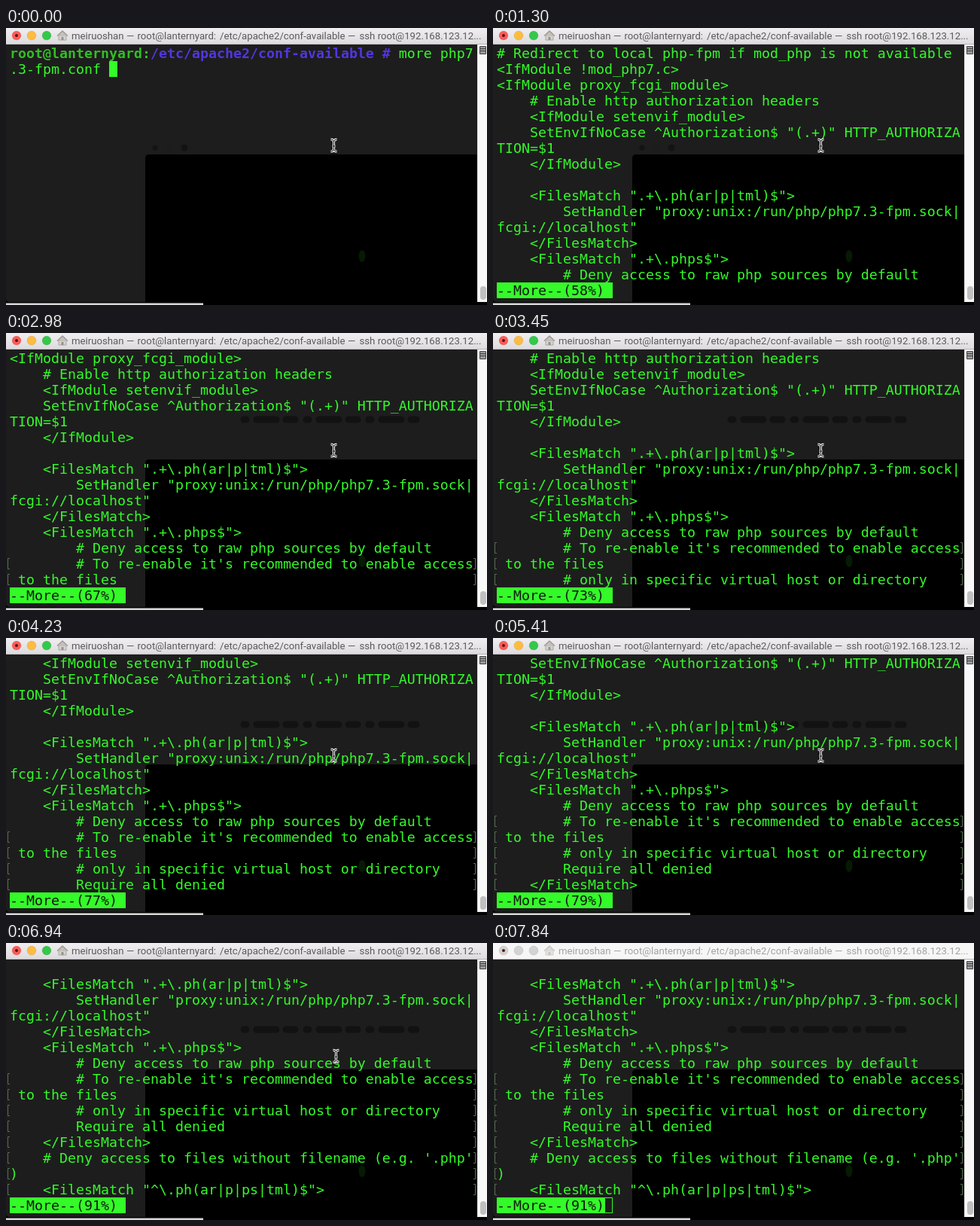
An HTML page for the animation above (7.94 s loop, 639x368 px).

```html
<!DOCTYPE html>
<html lang="en">
<head>
<meta charset="utf-8">
<title>Terminal pager</title>
<style>
  html, body { margin: 0; width: 100%; height: 100%; overflow: hidden; background: #000; }
  #stage { position: relative; width: 639px; height: 368px; overflow: hidden; --green: #34fa29; }
  svg { position: absolute; left: 0; top: 0; }
  .title { font: 13.2px Roboto, "Liberation Sans", sans-serif; fill: #5b5b5b; }
  #bar { fill: url(#active); }
  .idle #bar { fill: #f6f6f6; }
  .idle .light { fill: #d3d3d3; }
  .idle .title { fill: #a2a2a2; }
  .idle .home { opacity: .5; }
  pre {
    position: absolute; left: 5px; top: 23px; margin: 0;
    font: 18.27px/21px "DejaVu Sans Mono", monospace; color: var(--green);
  }
  b { color: #34bd25; }
  b + b { color: #5335e2; }
  #more { position: absolute; left: 5px; top: 338px; width: 143px; height: 21px; background: var(--green); }
  #more pre { left: 0; top: 0; color: #101810; }
  #cursor { position: absolute; box-sizing: border-box; width: 11px; height: 21px; background: var(--green); }
  .idle #cursor { background: none; border: 1px solid var(--green); }
</style>
</head>
<body>
<div id="stage">
  <svg width="639" height="368">
    <defs>
      <linearGradient id="active" x2="0" y2="1">
        <stop stop-color="#f0eef0"/><stop offset="1" stop-color="#dddbdd"/>
      </linearGradient>
    </defs>
    <path d="M0 365.5H262V368H0Z" fill="#d8d8d8"/>
    <path d="M0 21H627V364H5Q0 364 0 359Z" fill="#1d1d1d"/>
    <path d="M185 364V173Q185 168 190 168H627V364Z" fill="#000"/>
    <g id="dots" fill="#121412">
      <circle cx="198" cy="159" r="3.5"/><circle cx="217" cy="159" r="4" fill="#191f18"/><circle cx="237" cy="159" r="4.5"/>
    </g>
    <path id="blur" d="M316 115H545" stroke="#121212" stroke-width="9" stroke-linecap="round" stroke-dasharray="3 14 26 13 12 15"/>
    <ellipse cx="473" cy="303" rx="4.5" ry="8" fill="#061a04"/>

    <rect id="bar" width="639" height="21.5"/>
    <path d="M0 21.5H639" stroke="#b4b2b4"/>
    <g stroke="#0002" stroke-width=".6">
      <circle class="light" cx="14" cy="10" r="6" fill="#fc5b57"/>
      <circle class="light" cx="34" cy="10" r="6" fill="#fdbc40"/>
      <circle class="light" cx="54" cy="10" r="6" fill="#34c84a"/>
    </g>
    <circle cx="14" cy="10" r="2" fill="#5a1512"/>
    <g class="home">
      <path d="M70 10H80V16H70Z" fill="#d6d2ce" stroke="#aaa7a4"/>
      <path d="M68 10.5L75 4L82 10.5" fill="#c4c0bc" stroke="#9e9a96" stroke-width="1.4"/>
      <path d="M73.5 12H76.5V16H73.5Z" fill="#98928c"/>
    </g>
    <g class="title">
      <text x="87" y="15">meiruoshan</text><text x="160" y="15">—</text>
      <text x="174.5" y="15">root@lanternyard:</text>
      <text x="284" y="15">/etc/apache2/conf-available</text><text x="454" y="15">—</text>
      <text x="469.5" y="15">ssh root@192.168.123.12...</text>
    </g>

    <path d="M626 22H639V364H626Z" fill="#f8f8f8"/>
    <path d="M626.5 22V364" stroke="#dedede"/>
    <rect x="630" y="343" width="8" height="18" rx="4" fill="#c0c0c0"/>
    <path d="M629.5 24.5H637.5V34.5H629.5ZM630 27.5H637M630 30.5H637" fill="#999" stroke="#444"/>
    <path id="marks" fill="none" stroke="#557052"/>
  </svg>
  <pre id="text"></pre>
  <div id="more"><pre id="status"></pre></div>
  <div id="cursor"></div>
  <svg width="639" height="368" fill="none">
    <defs>
      <path id="caret" d="M431.5 148Q435.5 148 435.5 151V161Q435.5 164 431.5 164M439.5 148Q435.5 148 435.5 151M435.5 161Q435.5 164 439.5 164M433.5 157H437.5"/>
    </defs>
    <g id="beam">
      <use href="#caret" stroke="#fff" stroke-width="3"/>
      <use href="#caret" stroke="#111"/>
    </g>
  </svg>
</div>
<script>
const LOOP = 7940, COLS = 56, PAGE = 15, FILE_SIZE = 803;
const OPENED = 60, LEAVE = 6880, LEAVE_TIME = 340, BLURRED = 7840;
const scrolls = [1880, 2580, 3160, 4110, 5410, 5470, 5580, 5690];
const cursorOff = [[1640, 1880], [7400, 7840]];

const file = String.raw`# Redirect to local php-fpm if mod_php is not available
<IfModule !mod_php7.c>
<IfModule proxy_fcgi_module>
    # Enable http authorization headers
    <IfModule setenvif_module>
    SetEnvIfNoCase ^Authorization$ "(.+)" HTTP_AUTHORIZATION=$1
    </IfModule>

    <FilesMatch ".+\.ph(ar|p|tml)$">
        SetHandler "proxy:unix:/run/php/php7.3-fpm.sock|fcgi://localhost"
    </FilesMatch>
    <FilesMatch ".+\.phps$">
        # Deny access to raw php sources by default
        # To re-enable it's recommended to enable access to the files
        # only in specific virtual host or directory
        Require all denied
    </FilesMatch>
    # Deny access to files without filename (e.g. '.php')
    <FilesMatch "^\.ph(ar|p|ps|tml)$">`;

const prompt = "<b>root@lanternyard:</b><b>/etc/apache2/conf-available #</b> more php7\n.3-fpm.conf ";

// Wrap to terminal rows, noting how many bytes have been read after each
const rows = [], read = [];
let bytes = 0;
for (const line of file.split("\n")) {
  for (let i = 0; i === 0 || i < line.length; i += COLS) {
    const part = line.slice(i, i + COLS);
    rows.push(part);
    bytes += part.length + (i + COLS >= line.length);
    read.push(bytes);
  }
}

const $ = id => document.getElementById(id);
const show = (id, on) => { $(id).style.visibility = on ? "" : "hidden"; };
let shown;

function showText(step) {
  if (step === shown) return;
  shown = step;
  const paging = step >= 0;
  show("more", paging);
  show("dots", step < 2);
  show("blur", step >= 2);
  $("cursor").style.left = (paging ? 148 : 137) + "px";
  $("cursor").style.top = (paging ? 338 : 44) + "px";
  let marks = "";
  if (paging) {
    $("text").textContent = rows.slice(step, step + PAGE).join("\n");
    $("status").textContent = `--More--(${Math.floor(read[step + PAGE - 1] / FILE_SIZE * 100)}%)`;
    for (let r = PAGE - step; r < PAGE; r++) {
      const y = 26.5 + 21 * r;
      marks += `M5 ${y}h-2.5v14h2.5M621 ${y}h2.5v14h-2.5`;
    }
  } else {
    $("text").innerHTML = prompt;
  }
  $("marks").setAttribute("d", marks);
}

function draw(now) {
  const t = now % LOOP;
  showText(t < OPENED ? -1 : scrolls.filter(s => t >= s).length);
  $("stage").className = t >= BLURRED ? "idle" : "";
  show("cursor", !cursorOff.some(([from, to]) => t >= from && t < to));

  // The pointer leaves over the top edge
  const away = Math.min(1, Math.max(0, (t - LEAVE) / LEAVE_TIME)) ** 2;
  $("beam").setAttribute("transform", `translate(${90 * away} ${-180 * away})`);
}

const start = performance.now();
function frame() {
  draw(performance.now() - start);
  requestAnimationFrame(frame);
}
frame();
</script>
</body>
</html>
```
